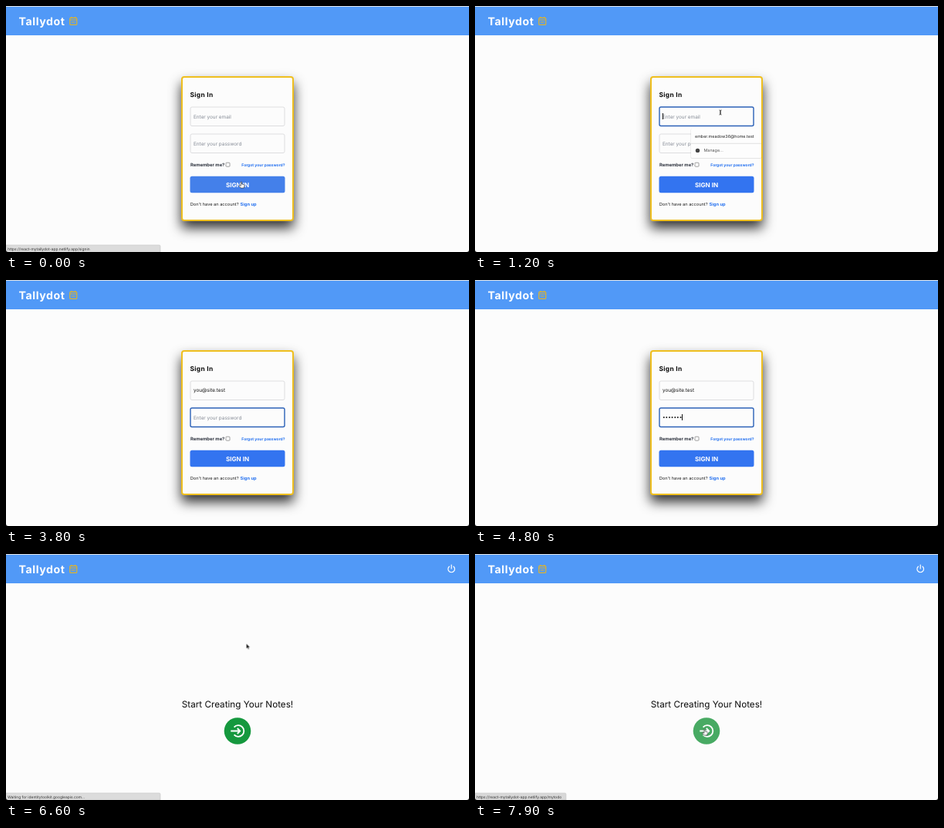
Write an HTML page that moves like this. It is 600 px wide and 319 px high and loops after 8 s.

```html
<!DOCTYPE html>
<html lang="en">
<head>
<meta charset="utf-8">
<title>Sign in demo</title>
<style>
  html, body { margin: 0; width: 100%; height: 100%; overflow: hidden; background: #fcfcfc; }
  #stage { position: relative; width: 600px; height: 319px; overflow: hidden; font-family: Inter, Roboto, sans-serif; }
  #stage svg, .form { position: absolute; left: 0; top: 0; }
  text { text-rendering: geometricPrecision; }

  /* 1% of the 8 s loop is 80 ms */
  .anim { animation: 8s step-end -.02s infinite; }
  .form { animation-name: form; }
  .notes { animation-name: notes; }
  @keyframes form { 0% { opacity: 1 } 82.5%, 100% { opacity: 0 } }
  @keyframes notes { 0% { opacity: 0 } 82.5%, 100% { opacity: 1 } }

  .card {
    position: absolute; left: 227px; top: 91px; width: 142px; height: 184px;
    border: 2px solid #efbf1f; border-radius: 4px; background: #fcfcfc;
    box-shadow: 0 9px 16px rgba(0, 0, 0, .8);
  }
  .field { fill: #fcfcfc; stroke: #d6d6d8; stroke-width: .8px; }
  .field.email { animation-name: email-focus; }
  .field.pass { animation-name: pass-focus; }
  @keyframes email-focus {
    0%, 42.5%, 100% { stroke: #d6d6d8; stroke-width: .8px }
    12.5% { stroke: #2c62b8; stroke-width: 1.4px }
  }
  @keyframes pass-focus {
    0%, 100% { stroke: #d6d6d8; stroke-width: .8px }
    42.5% { stroke: #2c62b8; stroke-width: 1.4px }
  }

  .hint { fill: #858b96; font-size: 6.4px; }
  .hint.email { animation-name: email-hint; }
  .hint.pass { animation-name: pass-hint; }
  @keyframes email-hint { 0% { opacity: 1 } 22.5%, 100% { opacity: 0 } }
  @keyframes pass-hint { 0% { opacity: 1 } 50%, 100% { opacity: 0 } }

  .submit { fill: #3374f0; animation-name: submit; animation-timing-function: linear; }
  @keyframes submit { 0%, 2% { fill: #4480ea } 5%, 100% { fill: #3374f0 } }

  .popup { animation-name: popup; }
  @keyframes popup { 0%, 22.5%, 100% { opacity: 0 } 12.5% { opacity: 1 } }

  .typed {
    position: absolute; left: 243px; height: 14px; display: flex; align-items: center;
    font-size: 6.4px; color: #111; white-space: nowrap; text-rendering: geometricPrecision;
  }
  .typed b { font-weight: 400; font-size: 0; animation: 8s step-end calc(var(--at) - 20ms) infinite; }
  #email b { animation-name: email-char; }
  #pass b { animation-name: pass-char; }
  @keyframes email-char { 0% { font-size: 6.4px } 60%, 100% { font-size: 0 } }
  @keyframes pass-char { 0% { font-size: 6.4px } 35%, 100% { font-size: 0 } }

  .caret { width: .8px; height: 8px; background: #111; }
  .caret.email { animation-name: email-caret; }
  .caret.pass { animation-name: pass-caret; }
  @keyframes email-caret { 0%, 18.75%, 42.5%, 100% { opacity: 0 } 12.5%, 22.5% { opacity: 1 } }
  @keyframes pass-caret { 0%, 47.5%, 67.5%, 80%, 100% { opacity: 0 } 42.5%, 50%, 75% { opacity: 1 } }

  .go { fill: #15983e; animation-name: go; animation-timing-function: linear; }
  @keyframes go { 0%, 90% { fill: #15983e } 92.5%, 100% { fill: #48aa63 } }

  .status { font-size: 4.9px; fill: #333; }
  .status.signin { animation-name: status-signin; }
  .status.wait { animation-name: status-wait; }
  .status.todo { animation-name: status-todo; }
  @keyframes status-signin { 0% { opacity: 1 } 6.25%, 100% { opacity: 0 } }
  @keyframes status-wait { 0%, 91.25%, 100% { opacity: 0 } 82.5% { opacity: 1 } }
  @keyframes status-todo { 0% { opacity: 0 } 96.25%, 100% { opacity: 1 } }

  .cursor { animation-name: move; animation-timing-function: ease-in-out; }
  @keyframes move {
    0%, 1.25% { transform: translate(305px, 228px) }
    11.25%, 70% { transform: translate(318px, 138px) }
    70.1%, 82.5% { transform: translate(311.5px, 116px) }
    92.5% { transform: translate(299px, 229px) }
    94%, 100% { transform: translate(297.5px, 227px) }
  }
  .hand { animation-name: hand; }
  .arrow { animation-name: arrow; }
  .beam { animation-name: beam; }
  @keyframes hand { 0%, 91.25%, 100% { opacity: 1 } 3.75% { opacity: 0 } }
  @keyframes arrow { 0%, 10%, 91.25%, 100% { opacity: 0 } 3.75%, 82.5% { opacity: 1 } }
  @keyframes beam { 0%, 22.5%, 100% { opacity: 0 } 10% { opacity: 1 } }
</style>
</head>
<body>
<div id="stage">
  <svg width="600" height="319">
    <rect width="600" height="38" fill="#5199f7"/>
    <rect width="600" height="1" fill="#dfe3e8"/>
    <text x="16.5" y="25" font-size="14.2" font-weight="700" letter-spacing=".55" fill="#fff">Tallydot</text>
    <g fill="none" stroke="#dfb32c" stroke-width="1.2">
      <rect x="82.8" y="15.4" width="9" height="9" rx="1"/>
      <path d="M82.8 18H91.8M84.8 14V16M89.8 14V16M84.8 21H89.6"/>
    </g>
  </svg>

  <div class="form anim">
    <div class="card"></div>
    <svg width="600" height="319">
      <text x="238.5" y="118" font-size="8.4" font-weight="700" letter-spacing=".3" fill="#0c0c0c">Sign In</text>
      <rect class="field email anim" x="239" y="131" width="122" height="24.5" rx="2"/>
      <rect class="field pass anim" x="239" y="166" width="122" height="24.5" rx="2"/>
      <text class="hint email anim" x="243" y="145.6">Enter your email</text>
      <text class="hint pass anim" x="243" y="180.6">Enter your password</text>
      <text x="239" y="208" font-size="5.9" font-weight="600" fill="#151b28">Remember me?</text>
      <rect x="285" y="203.2" width="5" height="5" rx=".8" fill="#fff" stroke="#777" stroke-width=".7"/>
      <text x="361.5" y="207.6" font-size="5" font-weight="700" fill="#2672f0" text-anchor="end">Forgot your password?</text>
      <rect class="submit anim" x="238.5" y="220.8" width="123" height="21.5" rx="2.5"/>
      <text x="300" y="234.5" font-size="8.1" font-weight="700" fill="#fff" text-anchor="middle">SIGN IN</text>
      <text x="238.8" y="258.6" font-size="5.65" fill="#222">Don't have an account?</text>
      <text x="303.5" y="258.6" font-size="5.75" font-weight="700" fill="#2672f0">Sign up</text>
      <g class="popup anim">
        <rect x="279.6" y="159.3" width="91.6" height="38.4" rx="1.5" fill="#000" opacity=".12"/>
        <rect x="280" y="159" width="91" height="38" rx="1.5" fill="#fdfdfd"/>
        <path d="M280 178.3H371" stroke="#dadada" stroke-width=".8"/>
        <text x="285" y="171" font-size="5.4" fill="#222">ember.meadow36@home.test</text>
        <circle cx="288.5" cy="187.4" r="2.7" fill="#444"/>
        <text x="296.5" y="189.4" font-size="5.4" fill="#555">Manage...</text>
      </g>
    </svg>
    <div class="typed" style="top:136.3px"><span id="email"></span><i class="caret email anim"></i></div>
    <div class="typed" style="top:171.3px"><span id="pass"></span><i class="caret pass anim"></i></div>
  </div>

  <svg width="600" height="319">
    <g class="notes anim">
      <g fill="none" stroke="#fff" stroke-width="1.2" stroke-linecap="round">
        <path d="M574.4 16.2A4.3 4.3 0 1 0 580 16.2M577.2 14V19"/>
      </g>
      <text x="300" y="199.3" font-size="11.7" fill="#0c0c0c" text-anchor="middle">Start Creating Your Notes!</text>
      <circle class="go anim" cx="300" cy="229.5" r="17.3"/>
      <path d="M295.6 224.6A7.3 7.3 0 1 1 295.6 234.4M291.3 229.5H303.2M299.8 226L303.3 229.5L299.8 233"
            fill="none" stroke="#fff" stroke-width="1.8"/>
    </g>

    <g class="status signin anim">
      <path d="M0 310H198.5Q200 310 200 311.5V319H0Z" fill="#dcdcdc" stroke="#c4c4c4" stroke-width=".6"/>
      <text x="2" y="316.5">https://react-mytallydot-app.netlify.app/signin</text>
    </g>
    <g class="status wait anim">
      <path d="M0 310H198.5Q200 310 200 311.5V319H0Z" fill="#dcdcdc" stroke="#c4c4c4" stroke-width=".6"/>
      <text x="2" y="316.5">Waiting for identitytoolkit.googleapis.com...</text>
    </g>
    <g class="status todo anim">
      <path d="M0 310H116.5Q118 310 118 311.5V319H0Z" fill="#d8d8d8" stroke="#c8c8c8" stroke-width=".6"/>
      <text x="2" y="316.5">https://react-mytallydot-app.netlify.app/mytodo</text>
    </g>
    <path d="M0 316Q0 319 3 319H0ZM600 316Q600 319 597 319H600Z" fill="#111"/>

    <g class="cursor anim">
      <path class="hand anim" d="M-.7 .3Q0 -.6 .7 .3V3L3.4 3.6Q4.2 4 4 5L3.3 8H-.9L-3 5Q-2.6 4 -1.7 4.6L-.7 5.4Z"
            fill="#fff" stroke="#222" stroke-width=".6"/>
      <path class="arrow anim" d="M0 0V6.6L1.5 5.3L2.6 7.6L3.6 7.1L2.6 4.9H4.6Z"
            fill="#111" stroke="#fff" stroke-width=".4"/>
      <path class="beam anim" d="M-1.5 -3Q0 -3 0 -2V2Q0 3 -1.5 3M1.5 -3Q0 -3 0 -2V2Q0 3 1.5 3"
            fill="none" stroke="#222" stroke-width=".8"/>
    </g>
  </svg>
</div>
<script>
  // Each character appears at its own time; the caret follows in the text flow.
  function typeInto(id, text, timeOf) {
    const target = document.getElementById(id);
    [...text].forEach((char, i) => {
      const letter = document.createElement('b');
      letter.textContent = char;
      letter.style.setProperty('--at', timeOf(i) + 'ms');
      target.append(letter);
    });
  }
  typeInto('email', 'you@site.test', i => 1800 + 100 * i + (i > 5 ? 100 : 0));
  typeInto('pass', '•'.repeat(8), i => i < 5 ? 4000 + 100 * i : 4600 + 200 * (i - 5));
</script>
</body>
</html>
```
